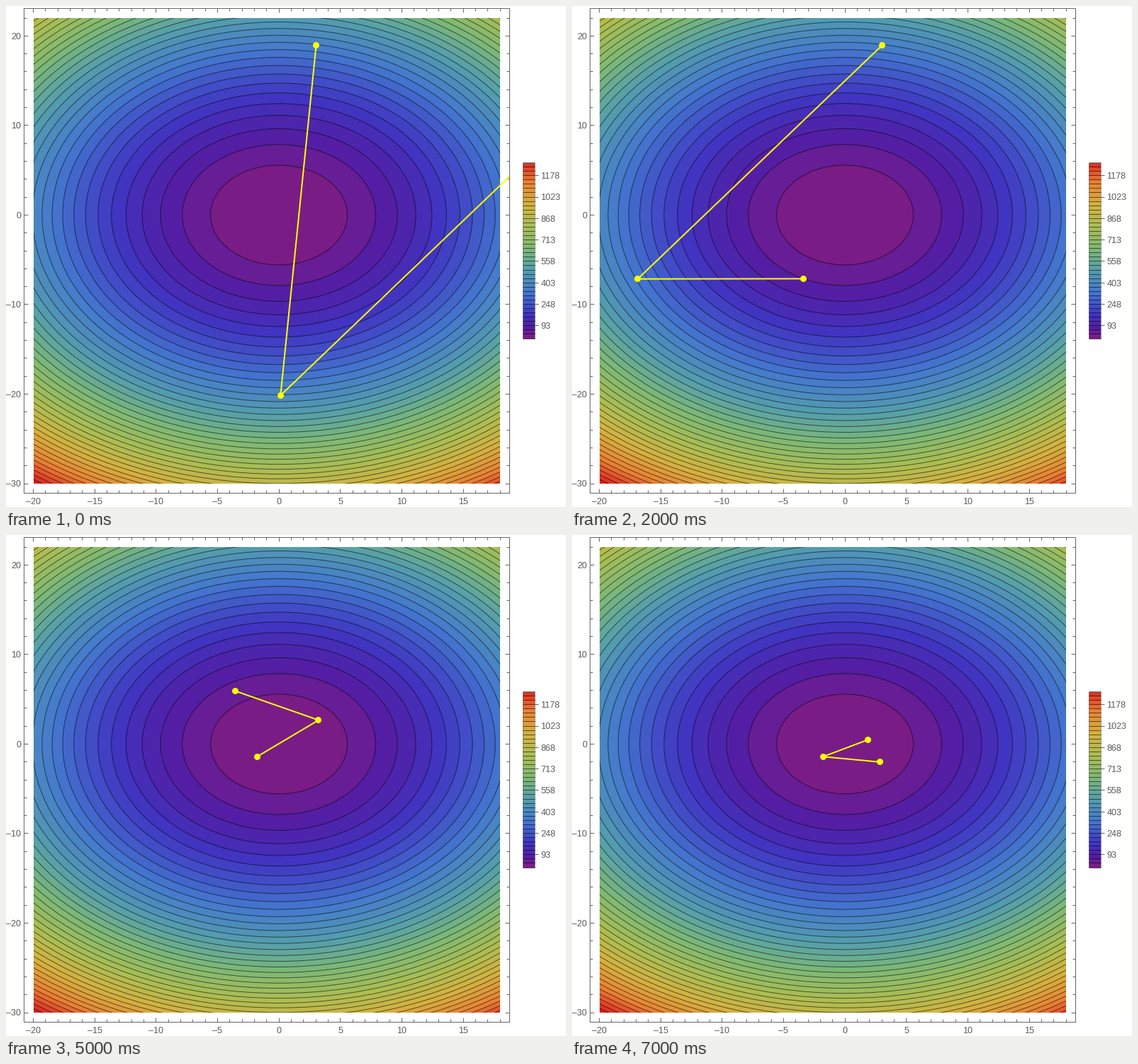
Animation, 790 px wide and 708 px high, one loop 8000 ms. Source, as a matplotlib script:

```python
import numpy as np
import matplotlib.pyplot as plt
from matplotlib.animation import FuncAnimation
from matplotlib.colors import LinearSegmentedColormap
from matplotlib.patches import Ellipse, Rectangle

W, H, DPI = 790, 708, 100
PX = 72 / DPI
LEFT, RIGHT, TOP, BOTTOM = 38.5, 697, 17, 675
FRAME = (25, 3, 710, 688)
SX, SY = (RIGHT - LEFT) / 38, (BOTTOM - TOP) / 52
STEP, BANDS = 31, 42
GRAY, INK, YELLOW = "#666666", "#5a5a5a", "#ffff00"

# Eighths of the range, plus one extra stop near the dark end.
COLORS = ("#7a1c86 #521ea5 #4035c1 #4476ce #549ead "
          "#7fb974 #aabe54 #d4b240 #e88234 #db2122").split()
STOPS = np.r_[0, .05, np.arange(1, 9) / 8]
cmap = LinearSegmentedColormap.from_list(
    "spectrum", list(zip(STOPS, COLORS)), N=1024)


def px(x):
    return LEFT + (x + 20) * SX


def py(y):
    return TOP + (22 - y) * SY


def band_color(k):
    return cmap(k / (BANDS - 1))


def cost(p):
    return p @ p


def simplex_step(pts):
    """One Nelder-Mead step on points sorted from worst to best."""
    worst, second, best = pts
    mid = (second + best) / 2
    new = 2 * mid - worst
    if cost(new) < cost(best):
        far = 3 * mid - 2 * worst
        if cost(far) < cost(new):
            new = far
    elif cost(new) >= cost(second):
        toward = new if cost(new) < cost(worst) else worst
        new = (mid + toward) / 2
    return sorted([second, best, new], key=cost, reverse=True)


fig = plt.figure(figsize=(W / DPI, H / DPI), dpi=DPI, facecolor="white")
ax = fig.add_axes([0, 0, 1, 1])
ax.set_xlim(0, W)
ax.set_ylim(H, 0)
ax.axis("off")


def line(x0, y0, x1, y1, color=GRAY, **kw):
    """A crisp one-pixel line on whole pixels."""
    ax.plot(np.floor([x0, x1]), np.floor([y0, y1]), color=color, lw=PX,
            solid_capstyle="butt", **kw)


def box(x0, y0, x1, y1, fill="none", edge="none", **kw):
    return ax.add_patch(Rectangle((x0, y0), x1 - x0, y1 - y0, fc=fill,
                                  ec=edge, lw=PX, **kw))


def label(x, y, value, ha):
    text = str(value).replace("-", "\u2013")
    ax.text(x, y + 4.4, text, ha=ha, va="baseline", color=INK,
            family="Liberation Sans", fontsize=12.5 * PX)


def draw_field():
    area = box(39, TOP, RIGHT, BOTTOM, band_color(BANDS - 1))
    for k in range(BANDS - 1, 0, -1):
        r = np.sqrt(STEP * k)
        ring = Ellipse((px(0), py(0)), 2 * r * SX, 2 * r * SY,
                       fc=band_color(k - 1), ec=(0, 0, 0, .55), lw=PX)
        ax.add_patch(ring)
        ring.set_clip_path(area)


def draw_axes():
    x0, y0, x1, y1 = FRAME
    box(*FRAME, edge=GRAY)
    for v in range(-20, 19):
        major = v % 5 == 0
        n = 6 if major else 4
        line(px(v), y1, px(v), y1 - n)
        line(px(v), y0, px(v), y0 + n)
        if major:
            label(px(v), 700, v, "center")
    for v in range(-30, 23, 2):
        major = v % 10 == 0
        n = 6 if major else 4
        line(x0, py(v), x0 + n, py(v))
        line(x1, py(v), x1 - n, py(v))
        if major:
            label(21.3, py(v), v, "right")


def draw_legend():
    x0, x1, bottom, h = 729, 746, 470, 6.06
    for k in range(BANDS - 1):
        box(x0, bottom - (k + 1) * h, x1, bottom - k * h, band_color(k))
    for k in range(BANDS):
        y = bottom - k * h
        line(x0, y, x1, y, "black", alpha=.55)
        if k % 5 == 3:
            line(x1, y, x1 + 5, y)
            label(754.5, y, STEP * k, "left")
    box(x0, bottom - (BANDS - 1) * h, x1, bottom, edge=GRAY, alpha=.6)


draw_field()
draw_axes()
draw_legend()

steps = [[np.array(p) for p in [(20, 6), (.1, -20.1), (3, 19)]]]
while len(steps) < 8:
    steps.append(simplex_step(steps[-1]))

window = Rectangle(FRAME[:2], FRAME[2] - FRAME[0], FRAME[3] - FRAME[1],
                   transform=ax.transData)
path, = ax.plot([], [], color=YELLOW, lw=2 * PX, zorder=5)
dots, = ax.plot([], [], "o", color=YELLOW, ms=9 * PX, mec="none", zorder=6)
for artist in (path, dots):
    artist.set_clip_path(window)


def update(i):
    x, y = np.array(steps[i]).T
    path.set_data(px(x) + .5, py(y) + .5)
    dots.set_data(px(x), py(y))
    return path, dots


anim = FuncAnimation(fig, update, frames=len(steps), interval=1000, repeat=True)
plt.show()
```
